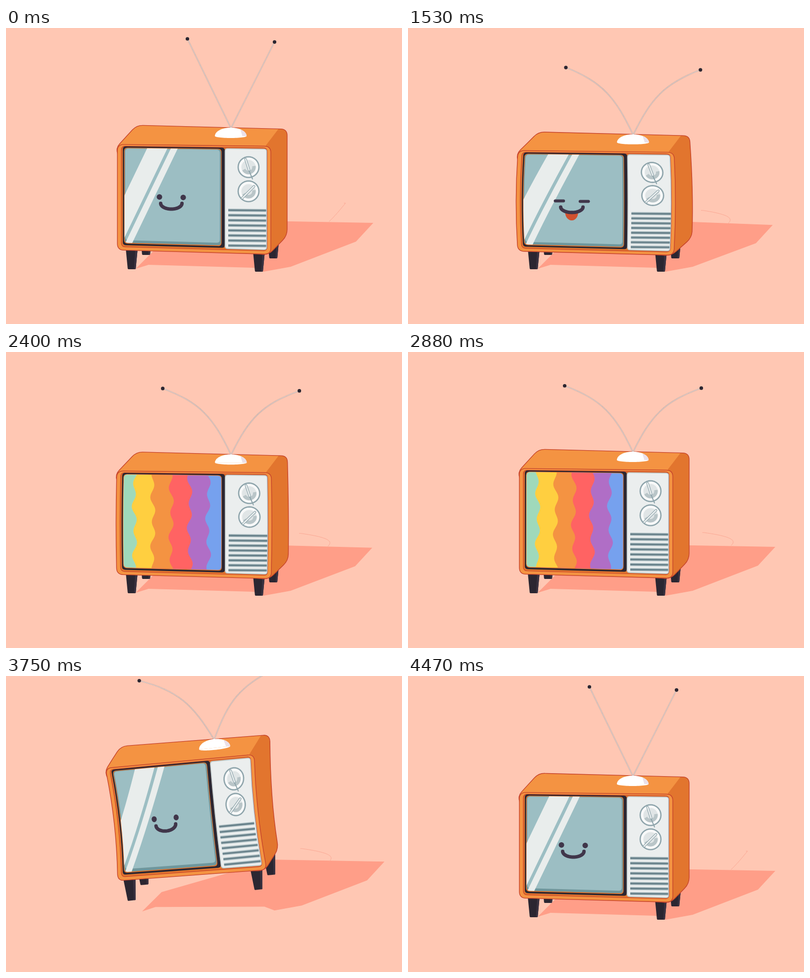
An HTML page with a canvas for the animation above (4.5 s loop, 800 by 600 pixels).

```html
<!DOCTYPE html>
<html lang="en">
<head>
<meta charset="utf-8">
<title>Happy television</title>
<style>
  html, body { margin: 0; width: 100%; height: 100%; overflow: hidden; background: #ffc7b3; }
  canvas { display: block; width: 800px; height: 600px; }
</style>
</head>
<body>
<canvas id="stage" width="800" height="600"></canvas>
<script>
const ctx = document.getElementById('stage').getContext('2d');
const LOOP = 4500, LAND = 3930;
const RED = '#c6432b', ORANGE = '#f49342', SIDE = '#e2752e', DARK = '#2b2631';
const INK = '#40364a', STEEL = '#8ea4ab', PANEL = '#ebeeee', SHADE = '#ff9e88';
const STRIPES = ['#9fd9bb', '#ffcf40', '#f49342', '#ff6363', '#b06ec6', '#76a1ee'];
const { PI, sin, cos, exp, min, max, hypot } = Math;

const lerp = (a, b, p) => a + (b - a) * p;
const mix = (a, b, p) => [lerp(a[0], b[0], p), lerp(a[1], b[1], p)];
const clamp = x => max(0, min(1, x));
const ramp = (t, from, to) => clamp((t - from) / (to - from));
const ease = p => (1 - cos(PI * p)) / 2;
const swing = (t, from, to) => ease(ramp(t, from, to));

let squash = 0, hop = 0, tilt = 0;

const turn = ([x, y]) => [x * cos(tilt) - y * sin(tilt), x * sin(tilt) + y * cos(tilt)];

// Slow sag, release, crouch, stretch, then a damped bounce after landing.
function squashAt(t) {
  const sag = 14 * (swing(t, 0, 1740) - swing(t, 1740, 2900));
  const leap = 12 * swing(t, 3480, 3600) - 34 * swing(t, 3600, 3770) + 22 * swing(t, 3770, LAND);
  const s = max(0, t - LAND);
  return sag + leap + 18 * exp(-s / 70) * sin(PI * s / 100);
}

// Squash and bulge above the feet, then tilt on the front left leg and lift.
function warp([x, y]) {
  const u = (490 - y) / 288;
  const wide = 0.006 * clamp(u * 8) + 0.04 * sin(PI * clamp(u)) ** 1.5;
  const [dx, dy] = turn([
    x + (x - 397) * wide * squash / 13 - 254,
    y + squash * u * (1.35 - 0.35 * u) - 489
  ]);
  return [254 + dx, 489 + dy - 38 * hop];
}

// Warped polygon with rounded corners; long edges bend with the body.
function shape(pts, r = 0) {
  const out = new Path2D(), n = pts.length;
  const near = (a, b) => mix(a, b, r / hypot(b[0] - a[0], b[1] - a[1]));
  pts.forEach((p, i) => {
    const next = pts[(i + 1) % n];
    const a = near(p, next), b = near(next, p);
    if (!i) out.moveTo(...warp(a));
    out.bezierCurveTo(...warp(mix(a, b, 1 / 3)), ...warp(mix(a, b, 2 / 3)), ...warp(b));
    if (r) out.quadraticCurveTo(...warp(next), ...warp(near(next, pts[(i + 2) % n])));
  });
  out.closePath();
  return out;
}

// Warped open line through points.
function line(pts) {
  const out = new Path2D();
  pts.forEach(p => out.lineTo(...warp(p)));
  return out;
}

function arc(x, y, rx, ry = rx, from = 0, to = 2 * PI) {
  const pts = [];
  for (let i = 0; i <= 32; i++) {
    const a = lerp(from, to, i / 32);
    pts.push([x + rx * cos(a), y + ry * sin(a)]);
  }
  return line(pts);
}

// Front-facing box whose edges follow the perspective of the cabinet.
const box = (l, t, r, b, radius) => {
  const w = r - l;
  return shape([[l, t], [r, t + 0.012 * w], [r, b + 0.028 * w], [l, b]], radius);
};

function fill(p, color) {
  ctx.fillStyle = color;
  ctx.fill(p);
}

function stroke(p, color, width = 1.4) {
  ctx.strokeStyle = color;
  ctx.lineWidth = width;
  ctx.stroke(p);
}

function shadow(droop) {
  const sag = max(0, squash) / 13;
  // Higher parts throw their shadow further up and right.
  const cast = ([x, y]) => {
    const rise = hop * (38 + 30 * ramp(x, 254, 511));
    const far = sag * ramp(x, 575, 742);
    return [x + 0.37 * rise - 5 * far, y - 0.31 * rise + 4 * far];
  };
  const floor = [[262, 488], [288, 480], [500, 486], [520, 494], [575, 484],
    [707, 433], [742, 395], [520, 391], [300, 450]];
  ctx.fillStyle = SHADE;
  ctx.beginPath();
  floor.forEach(p => ctx.lineTo(...cast(p)));
  ctx.fill();

  ctx.save();
  ctx.translate(-6 * sag, 4 * sag - 18 * hop);
  const rod = new Path2D(), tip = mix([686, 355], [598, 366], droop);
  rod.moveTo(653, 392);
  rod.bezierCurveTo(664, 382, ...mix([675, 368], [655, 374], droop), ...tip);
  rod.lineTo(tip[0] - 3, tip[1]);
  stroke(rod, '#fba995', 1);
  ctx.restore();
}

function leg(x, foot) {
  const trapezoid = (l, r) => shape([[x + 13 * l, foot - 52], [x + 13 * r, foot - 52],
    [x + 8 * r, foot], [x + 8 * l, foot]], 1.5);
  fill(trapezoid(-1, 1), DARK);
  fill(trapezoid(0.6, 1), '#3a3240');
}

function legs() {
  const k = squash;
  squash = 0;
  leg(283, 460);
  leg(540, 467);
  leg(254, 489);
  leg(511, 494);
  squash = k;
}

function cabinet() {
  const shell = shape([[221, 244], [264, 197], [568, 205], [568, 421], [530, 460], [300, 440]], 13);
  fill(shell, ORANGE);
  ctx.save();
  ctx.clip(shell);
  fill(shape([[554, 200], [580, 200], [580, 430], [525, 475], [525, 238]]), SIDE);
  ctx.restore();
  stroke(shell, RED);
  const front = box(225, 236, 535, 450, 13), recess = box(233, 239.5, 527.5, 443.5, 8);
  fill(front, ORANGE);
  stroke(front, RED);
  fill(recess, SIDE);
  stroke(recess, RED, 1.2);
}

// Two-point bar with a pale core.
function pointer(x, y, dx, dy) {
  const bar = line([[x - dx, y - dy], [x + dx, y + dy]]);
  stroke(bar, STEEL, 5);
  stroke(bar, '#eef1f1', 2.6);
}

function knob(y) {
  fill(arc(490, y, 21), '#f8f9f9');
  stroke(arc(490, y, 21), STEEL, 2.6);
  fill(arc(490, y, 14.5), '#e0e5e6');
  ctx.lineCap = 'butt';
  stroke(arc(490, y, 11, 11, -0.2, 0.85 * PI), '#b9c5c8', 7);
  ctx.lineCap = 'round';
}

function controls() {
  const plate = box(442.5, 244.5, 526.5, 447, 5);
  fill(plate, PANEL);
  stroke(plate, '#b8c5c8', 1.6);
  knob(282);
  stroke(line([[490, 287], [498, 306]]), STEEL, 2);
  pointer(487.5, 277, 3.5, 11);
  knob(331);
  pointer(489, 333, 12, -12);
  ctx.lineCap = 'butt';
  for (let i = 0; i < 8; i++) {
    const y = 369.3 + i * 10.25;
    const slat = line([[449, y], [525.5, y + 0.6]]);
    stroke(slat, '#a0b3b8', 6);
    stroke(slat, '#5f7983', 2.4);
  }
  ctx.lineCap = 'round';
}

function rainbow(t) {
  const flow = (t - 3510) * 0.0586;
  for (let i = 5; i >= 0; i--) {
    const pts = [[225, 450], [225, 235]];
    for (let y = 235; y <= 450; y += 4) {
      const wave = 4 * cos(2 * PI * (y - flow) / 50 + i * 2.4) + 2 * sin((y + flow) / 21 + i);
      pts.push([i < 5 ? 262 + 36.5 * i + wave : 450, y]);
    }
    fill(line(pts), STRIPES[i]);
  }
}

function eye(x, y, shut, blink) {
  if (shut) stroke(line([[x - 8 * shut, y], [x + 8 * shut, y]]), INK, lerp(11, 6, shut));
  else fill(arc(x, y, 5.5, 5.5 * blink), INK);
}

function face(t) {
  const awake = t >= 3600;
  const shut = awake ? 0 : swing(t, 390, 480);
  const out = awake ? 0 : swing(t, 450, 600);
  const blink = 1 - 0.9 * (ramp(t, 4380, 4435) - ramp(t, 4435, 4465));
  eye(310, 342.5, shut, blink);
  eye(358, 343.5, shut, blink);
  if (out) fill(arc(333.5, 367, 12.5, 17 * out, 0, PI), '#d1512f');
  stroke(arc(334, 355.5, 21.5, 11.5, 0, PI), INK, 7);
}

// Slanted reflection across the glass.
function glare(x, w) {
  fill(shape([[x, 240], [x + w, 240], [x + w - 96, 440], [x - 96, 440]]), '#e9edec');
}

function screen(t) {
  fill(box(236, 240, 442, 440, 6), DARK);
  fill(box(238.5, 242.5, 435.5, 436.8, 7), SIDE);
  const glass = box(239.5, 243.5, 434.5, 435.3, 7);
  ctx.save();
  ctx.clip(glass);
  if (t >= 1680 && t < 3600) {
    rainbow(t);
  } else {
    fill(glass, '#6f979d');
    fill(box(241, 244.5, 432, 430, 6), '#9cbec3');
    glare(287, 41);
    glare(335, 14);
    face(t);
  }
  ctx.restore();
}

// One rod; side is -1 or 1, tall scales its height.
function antenna(side, tall, droop) {
  const base = warp([454.5, 203]);
  const at = (rest, bent) => {
    const [x, y] = mix([88 * rest, -181 * rest], bent, droop);
    const [dx, dy] = turn([x * side, y * tall]);
    return [base[0] + dx, base[1] + dy];
  };
  const tip = at(1, [138, -134.5]);
  const rod = new Path2D();
  rod.moveTo(...base);
  rod.bezierCurveTo(...at(0.41, [36, -76]), ...at(0.67, [62, -106]), ...tip);
  stroke(rod, '#b9a39f', 2.2);
  stroke(rod, '#f0e2dc', 1);
  ctx.fillStyle = DARK;
  ctx.beginPath();
  ctx.arc(...tip, 3.6, 0, 2 * PI);
  ctx.fill();
}

function dome() {
  const cap = arc(454, 219, 32, 17, PI, 2 * PI);
  fill(cap, '#fff');
  fill(arc(454, 219, 32, 4, 0, PI), '#fff');
  ctx.save();
  ctx.clip(cap);
  fill(shape([[472, 200], [490, 200], [490, 221], [478, 221]]), '#ebe0e8');
  ctx.restore();
}

function render(t) {
  const p = (t - 3795) / (LAND - 3795);
  hop = max(0, 1 - p * p);
  tilt = -6.75 * hop * PI / 180;
  squash = squashAt(t);
  const droop = swing(t, 400, 1700) - swing(t, 3960, 4150);

  ctx.fillStyle = '#ffc7b3';
  ctx.fillRect(0, 0, 800, 600);
  shadow(droop);
  legs();
  cabinet();
  screen(t);
  controls();
  antenna(-1, 1, droop);
  antenna(1, 0.965, droop);
  dome();
}

ctx.lineCap = ctx.lineJoin = 'round';
function tick() {
  render(performance.now() % LOOP);
  requestAnimationFrame(tick);
}
tick();
</script>
</body>
</html>
```
